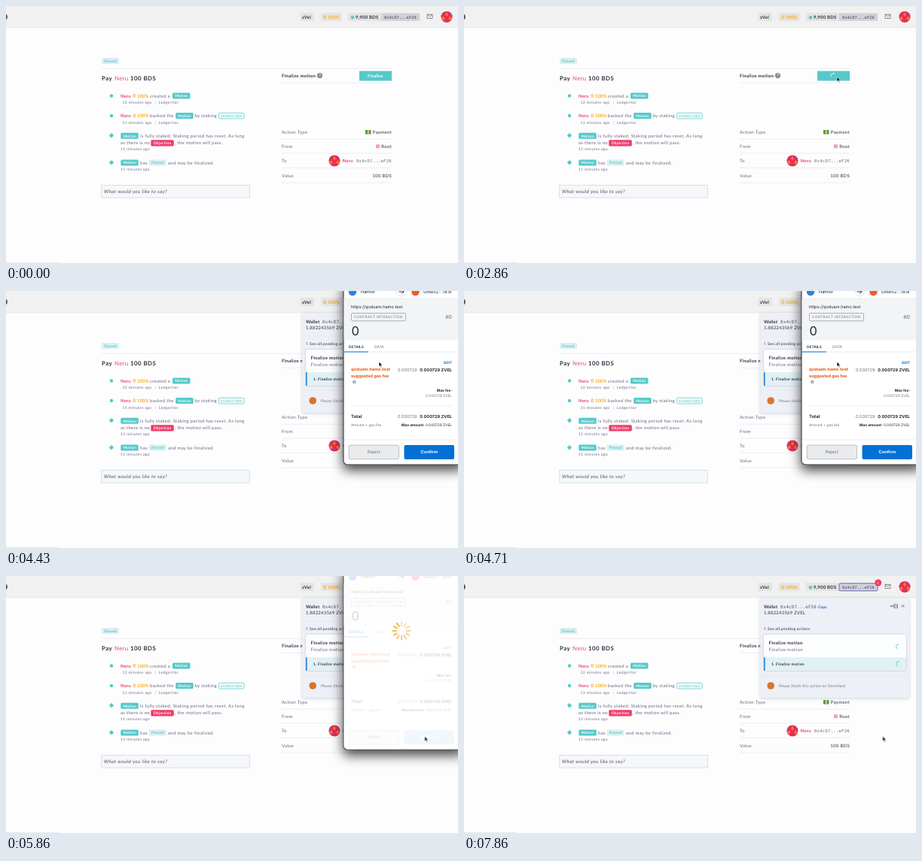
Write an HTML page that moves like this. It is 600x342 px and loops after 8 s.

```html
<!DOCTYPE html>
<html lang="en">
<head>
<meta charset="utf-8">
<title>Finalize motion</title>
<style>
  html, body { margin: 0; width: 100%; height: 100%; overflow: hidden; background: #fdfdfe; }
  svg { display: block; width: 600px; height: 342px; }
  text { font: 6px Lato, sans-serif; letter-spacing: .3px; fill: #6b6880; text-rendering: geometricPrecision; white-space: pre; }
  .b { font-weight: 700; }
  .dark { fill: #33313f; }
  .pink { fill: #f03f72; }
  .gold { fill: #f6a81f; }
  .teal { fill: #55c9ca; }
  .white { fill: #fff; }
  .mid { text-anchor: middle; }
  .end { text-anchor: end; }
  .it { font-style: italic; }
  .title { font-size: 7.8px; letter-spacing: .5px; font-weight: 700; }
  .sub { font-size: 5px; letter-spacing: .37px; }
  .tag { font-size: 4.9px; letter-spacing: .25px; font-weight: 700; text-anchor: middle; }
  .tiny { font-size: 4.2px; letter-spacing: .1px; }
  .small { font-size: 5px; letter-spacing: .26px; }
  .mono { font-family: "DejaVu Sans Mono", monospace; font-size: 5.3px; letter-spacing: .1px; }
  .rule { stroke: #e6e6ec; stroke-width: .7; }
  .line { fill: none; stroke-linecap: round; stroke-linejoin: round; }

  #dialog text { font-family: Inter, sans-serif; font-size: 5.6px; letter-spacing: 0; fill: #24272a; }
  #dialog .gray { fill: #6a737d; }
  #dialog .note { font-size: 4.8px; }
  #dialog .blue { fill: #0470d6; }
  #dialog .fee { fill: #e3580f; }
  #dialog .white { fill: #fff; }

  .on, .off { animation: 8s step-end infinite; }
  .on { opacity: 0; }
  .idle { animation-name: idle; }
  .busy { animation-name: busy; }
  .wallet { animation-name: wallet; }
  .ghost { animation-name: ghost; }
  .dialog { animation-name: dialog; }
  .veil { animation-name: veil; }
  .faded { animation-name: faded; }
  .before { animation-name: before; }
  .after { animation-name: after; }
  @keyframes idle { 32.1% { opacity: 0; } }
  @keyframes busy { 32.1% { opacity: 1; } }
  @keyframes wallet { 41% { opacity: 1; } }
  @keyframes ghost { 48.2% { opacity: 1; } 55.3% { opacity: 0; } }
  @keyframes dialog { 55.3% { opacity: 1; } 76.7% { opacity: 0; } }
  @keyframes veil { 69.6% { opacity: 1; } 76.7% { opacity: 0; } }
  @keyframes faded { 69.6% { opacity: .3; } 76.7% { opacity: 1; } }
  @keyframes before { 76.7% { opacity: 0; } }
  @keyframes after { 76.7% { opacity: 1; } }

  .spin { animation: spin 1s -.14s linear infinite; }
  .tick { animation: spin 1s -.2s steps(12) infinite; }
  @keyframes spin { to { transform: rotate(360deg); } }

  #pointer { animation: travel 8s ease-in-out infinite; }
  @keyframes travel {
    0%, 8.8% { opacity: 0; transform: translate(540px, 180px); }
    8.87% { opacity: 1; transform: translate(540px, 180px); }
    19.6% { opacity: 1; transform: translate(500.5px, 125.5px); }
    28.5%, 60% { opacity: 1; transform: translate(495px, 94px); }
    68%, 100% { opacity: 1; transform: translate(555.7px, 213.2px); }
  }
</style>
</head>
<body>
<svg viewBox="0 0 600 342">
  <defs>
    <clipPath id="round"><circle r="7.5"/></clipPath>
    <g id="avatar" clip-path="url(#round)">
      <path fill="#ec2a4c" d="M-8-8H8V8H-8z"/>
      <path fill="#b03fae" d="M-8-8H-3L-5-2-8 0zM8-8H3L5-2 8 0zM-2.5 3h5L0 6z"/>
      <path fill="#f5763c" d="M0-6.5 2-3 0 0-2-3zM-4.5-1-2 2-4.5 5-7 2zM4.5-1 7 2 4.5 5 2 2z"/>
    </g>
    <path id="star" class="line" stroke="#f6a81f" stroke-width=".7"
      d="M0-2.1.7-.7 2.1-.5 1 .5 1.3 2 0 1.3-1.3 2-1 .5-2.1-.5-.7-.7z"/>
    <g id="motion">
      <rect class="teal" width="23.5" height="8" rx="1.5"/>
      <text class="tag white" x="11.9" y="5.8">Motion</text>
    </g>
    <g id="passed">
      <rect fill="#d9eff1" width="23" height="8" rx="1.5"/>
      <text class="tag teal" x="11.6" y="5.8">Passed</text>
    </g>
    <g id="actor">
      <circle class="teal" cx="140" cy="-2" r="2.2"/>
      <text class="b pink" x="152" style="letter-spacing:.1px">Neru</text>
      <use href="#star" x="170.3" y="-2.2"/>
      <text class="b gold" x="174" style="letter-spacing:0">100%</text>
      <text class="sub" x="198" y="8.5" opacity=".6">|</text>
      <text class="sub" x="203" y="8.5">Ledgeritor</text>
    </g>
    <path id="diamond" class="teal" d="M0-3.2 3.2 0 0 3.2-3.2 0z"/>
    <path id="chevron" class="line" stroke="#55c9ca" d="M-2.8-1.2Q0 2.8 2.8-1.2"/>
    <path id="arc" class="line" stroke="#55c9ca" d="M0-3.2A3.2 3.2 0 0 0-1.6 2.8"/>
  </defs>

  <rect width="600" height="342" fill="#fdfdfe"/>
  <path fill="#e9e9ec" d="M0 341h70v1H0z"/>

  <!-- Header -->
  <rect width="600" height="28.5" fill="#f1f1f1"/>
  <path stroke="#e3e3e5" stroke-width=".8" d="M0 28.8H600"/>
  <circle cx="-2.6" cy="14.5" r="4.6" fill="#55545c"/>
  <g fill="#e4e4e5">
    <rect x="390.5" y="9" width="18.5" height="11" rx="1.5"/>
    <rect x="418" y="9" width="27.5" height="11" rx="1.5"/>
    <rect x="453.5" y="9" width="96" height="11" rx="1.5"/>
  </g>
  <text class="b dark" x="393" y="17">zVel</text>
  <use href="#star" x="423.3" y="14.8"/>
  <text class="b gold" x="427" y="17" style="letter-spacing:.1px">100%</text>
  <circle class="teal" cx="460" cy="15.2" r="2.3"/>
  <text class="b dark" x="464" y="17" style="letter-spacing:.22px">9,900 BDS</text>
  <rect x="498" y="9.8" width="51" height="10" rx="1.5" fill="#d1d1d7"/>
  <text class="mono b" x="502" y="17">0x4cD7...eF26</text>
  <path class="line" stroke="#5f5d6b" stroke-width=".7" d="M559.5 11.3h6.5v5.2h-6.5zl3.2 2.7 3.3-2.7"/>
  <use href="#avatar" x="585" y="14.5"/>

  <!-- Feed -->
  <use href="#passed" x="127" y="69"/>
  <path class="rule" d="M127 83.2H512M366 102.2H512M366 177.2H512M366 196H512M366 215.3H512M366 235H512"/>
  <text class="title dark" x="127" y="99">Pay</text>
  <text class="title pink" x="144" y="99" style="font-weight:400;letter-spacing:.3px">Neru</text>
  <text class="title dark" x="165" y="99">100 BDS</text>

  <use href="#actor" y="121.5"/>
  <text x="191" y="121.5">created a</text>
  <use href="#motion" x="221" y="115.6"/>
  <text class="sub" x="154.5" y="130">12 minutes ago</text>

  <use href="#actor" y="148"/>
  <text x="191" y="148">backed the</text>
  <use href="#motion" x="225.2" y="142"/>
  <text x="250.5" y="148">by staking</text>
  <rect x="282.3" y="142.2" width="34" height="7.8" rx="1.8" fill="#eefafa" stroke="#55c9ca" stroke-width=".7"/>
  <text class="tiny teal mid" x="299.3" y="147.6">44.09617 BDS</text>
  <text class="sub" x="154.5" y="156.5">11 minutes ago</text>

  <use href="#diamond" x="140" y="172.2"/>
  <use href="#motion" x="152.3" y="168.8"/>
  <text x="178" y="174.6">is fully staked; Staking period has reset. As long</text>
  <text x="152" y="184.2">as there is no</text>
  <rect x="192.3" y="178.2" width="30.5" height="8.2" rx="1.5" fill="#f23a6b"/>
  <text class="tag white" x="207.6" y="184">Objection</text>
  <text x="224" y="184.2">, the motion will pass.</text>
  <text class="sub" x="152" y="192.2">11 minutes ago</text>

  <use href="#diamond" x="140" y="208.2"/>
  <use href="#motion" x="152.3" y="204.6"/>
  <text x="178" y="210.6">has</text>
  <use href="#passed" x="189.8" y="204.6"/>
  <text x="215" y="210.6">and may be finalized.</text>
  <text class="sub" x="152" y="218.8">11 minutes ago</text>

  <rect x="126.8" y="238.6" width="196.5" height="16.5" fill="#f6f7fa" stroke="#bfdade" stroke-width=".7"/>
  <text class="it" x="130" y="249" style="font-size:6.3px;letter-spacing:.42px;fill:#4d4b5a">What would you like to say?</text>

  <!-- Details -->
  <text class="b dark" x="366" y="95">Finalize motion</text>
  <circle cx="416.5" cy="92.6" r="3.6" fill="#8d8c99"/>
  <text class="b white mid tiny" x="416.6" y="94.2" style="font-size:5px">?</text>
  <rect class="teal" x="469" y="86.5" width="43" height="13"/>
  <text class="b white mid off idle" x="490.3" y="95.1" style="font-size:5.8px;letter-spacing:.1px">Finalize</text>
  <g transform="translate(490.5 93)"><g class="on busy">
    <path class="line spin" stroke="#fff" stroke-width=".9" d="M-3.3.8A3.4 3.4 0 0 1 1.7-2.9"/>
  </g></g>

  <g class="b">
    <text x="366" y="170">Action Type</text>
    <text x="366" y="189">From</text>
    <text x="366" y="208.2">To</text>
    <text x="366" y="227.6">Value</text>
    <text class="dark end" x="512" y="170">Payment</text>
    <text class="dark end" x="512" y="189">Root</text>
    <text class="dark end" x="512" y="227.6">100 BDS</text>
  </g>
  <rect x="477" y="165" width="7.5" height="5.6" fill="#5c9b45"/>
  <path fill="#d8dc9a" d="M480 165h1.6v5.6H480z"/>
  <rect x="491" y="184.3" width="5" height="5" rx=".8" fill="#fb9dba"/>
  <use href="#avatar" x="436" y="206"/>
  <text class="b pink" x="446.5" y="208.2">Neru</text>
  <text class="mono" x="465" y="208.2" style="font-size:5.5px;letter-spacing:.3px">0x4cD7...eF26</text>

  <!-- Wallet panel -->
  <g class="on wallet">
    <rect x="498" y="9.8" width="51" height="10" rx="1.5" fill="none" stroke="#5a5fc4" stroke-width=".9"/>
    <circle cx="549.8" cy="9" r="4.5" fill="#f23a5f"/>
    <text class="white mid tiny" x="549.8" y="10.7" style="font-size:4.8px">1</text>
    <rect x="393.3" y="29" width="197.7" height="133" rx="1.5" fill="#edf0f6" style="filter:drop-shadow(0 1px 2px #3c4a6440)"/>
    <path class="rule" d="M394 60H591M394 132.5H591"/>
    <text class="b dark" x="398" y="43" style="letter-spacing:.15px">Wallet</text>
    <text class="mono" x="420" y="43" style="font-size:5.8px;letter-spacing:.2px;fill:#555366">0x4cD7...eF26</text>
    <text class="b small" x="470" y="42.8" style="fill:#3b58d8;letter-spacing:0">Copy</text>
    <text class="dark" x="398" y="51.3" style="letter-spacing:.2px">1.882243569 ZVEL</text>
    <path class="line" stroke="#565565" stroke-width=".7"
      d="M565.5 40h3.5m-1.2-1.2L569 40l-1.2 1.2M571 37.8h4.5v4.5H571zM571 40h4.5M581 38.4l3 3m0-3-3 3"/>
    <path class="line" stroke="#565565" stroke-width=".7" d="M400 68.3l-1.3 1.6 1.3 1.6"/>
    <text class="b small" x="403" y="71.8" style="fill:#565565">See all pending actions</text>
    <rect x="398" y="78" width="189" height="48" rx="2" fill="#fcfdfd" style="filter:drop-shadow(0 .5px 1.2px #3c4a6450)"/>
    <path fill="#e1f1f5" d="M398 108.2h189V126H398z"/>
    <path fill="#2681d2" d="M398 108.2h1.6V126H398z"/>
    <text class="b dark" x="404.5" y="91">Finalize motion</text>
    <text x="404.5" y="100" style="letter-spacing:.36px">Finalize motion</text>
    <text class="b dark small" x="408" y="119">1. Finalize motion</text>
    <rect class="on ghost" x="519.3" y="89" width="11.3" height="19" fill="#ededef"/>
    <g class="off before">
      <use href="#chevron" x="576.8" y="95.8"/>
      <use href="#chevron" x="576.8" y="118.8"/>
    </g>
    <g class="on after">
      <g transform="translate(576.8 94)"><use class="spin" href="#arc"/></g>
      <g transform="translate(576.8 117)"><use class="spin" href="#arc"/></g>
    </g>
    <circle cx="407.2" cy="146" r="4.8" fill="#d9742d"/>
    <text class="it small" x="418" y="147.9" style="letter-spacing:.3px">Please finish this action on OmniVask</text>
  </g>

  <!-- Confirmation window -->
  <g id="dialog" class="on dialog">
    <rect x="448" y="-12" width="160" height="243" rx="5" fill="#fff" stroke="#4a4a4e" stroke-width="1.2"
      style="filter:drop-shadow(0 7px 8px #000b)"/>
    <path fill="#f3f4f5" d="M448.6 10H600V65.5H448.6z"/>
    <path class="rule" d="M449 10H600M449 81H600M458 153H592M449 198H600"/>
    <circle cx="460" cy="1" r="5.2" fill="#2c84dc"/>
    <text x="471" y="3">Hamlor</text>
    <circle cx="525" cy="1" r="6" fill="#fff" stroke="#d6d9dc" stroke-width=".7"/>
    <path class="line" stroke="#24272a" stroke-width=".9" d="M522 1h6m-2.3-2.3L528 1l-2.3 2.3"/>
    <circle cx="543.5" cy="1" r="5.2" fill="#ee5b2b"/>
    <text x="554" y="3">0x6B52...7d19</text>
    <text x="458" y="22.8">https://qoduam.hamo.test</text>
    <rect x="458.5" y="29.6" width="72" height="10.2" rx="1.5" fill="none" stroke="#8b9198" stroke-width=".7"/>
    <text class="gray" x="462" y="36.4" style="font-size:4.6px;letter-spacing:.33px">CONTRACT INTERACTION</text>
    <text class="gray end" x="592" y="36.6" style="font-size:7px">#0</text>
    <text x="458.5" y="59.2" style="font-size:16.5px">0</text>
    <text class="b" x="455" y="75.8" style="font-size:4.8px;fill:#1b5687">DETAILS</text>
    <text class="gray" x="489" y="75.8" style="font-size:5px">DATA</text>
    <path stroke="#0470d6" d="M449 81H481"/>
    <text class="b blue end" x="592" y="97" style="font-size:4.7px">EDIT</text>
    <text class="b fee" x="458" y="106.3">qoduam.hamo.test</text>
    <text class="b fee" x="458" y="115">suggested gas fee</text>
    <circle cx="462.3" cy="121" r="2.3" fill="#9aa5b5"/>
    <path stroke="#fff" stroke-width=".7" d="M462.3 119.6v.6m0 .5v1.6"/>
    <text class="gray" x="520" y="106.5">0.000729</text>
    <text class="b end" x="592" y="106.5">0.000729 ZVEL</text>
    <text class="b note end" x="592" y="133.6">Max fee:</text>
    <text class="gray note end" x="592" y="140.5">0.000729 ZVEL</text>
    <text class="b" x="458" y="169" style="font-size:5.9px">Total</text>
    <text class="gray" x="520" y="169">0.000729</text>
    <text class="b end" x="592" y="169">0.000729 ZVEL</text>
    <text class="gray note" x="458" y="180">Amount + gas fee</text>
    <text class="note end" x="592" y="180"><tspan class="b">Max amount:</tspan> 0.000729 ZVEL</text>
    <rect x="455.2" y="205.2" width="66.4" height="18.6" rx="2" fill="#eaebed" stroke="#a3a8ad" stroke-width=".7"/>
    <text class="gray mid" x="488.3" y="216.4" style="font-size:5.8px">Reject</text>
    <g class="off faded">
      <rect x="528.5" y="205" width="66.5" height="19" rx="2" fill="#0470d6"/>
      <text class="white b mid" x="561.8" y="216.4" style="font-size:5.7px">Confirm</text>
    </g>
    <g class="on veil">
      <rect x="448.6" y="-12" width="160" height="242.4" rx="4.5" fill="#fff" fill-opacity=".82"/>
      <g transform="translate(525 73)"><g id="spokes" class="tick"></g></g>
    </g>
  </g>

  <path id="pointer" fill="#111" stroke="#fff" stroke-width=".6" stroke-linejoin="round"
    d="M0 0V6.6L1.5 5.3 2.6 7.7 3.7 7.2 2.6 4.9H4.7z"/>
</svg>
<script>
  const spokes = document.getElementById("spokes");
  for (let i = 0; i < 12; i++) {
    const spoke = document.createElementNS(spokes.namespaceURI, "path");
    spoke.setAttribute("d", "M0-6.8V-11.8");
    spoke.setAttribute("class", "line");
    spoke.setAttribute("stroke", "#efae35");
    spoke.setAttribute("stroke-width", 1.9);
    spoke.setAttribute("opacity", 0.35 + 0.6 * i / 11);
    spoke.setAttribute("transform", `rotate(${i * 30})`);
    spokes.append(spoke);
  }
</script>
</body>
</html>
```
